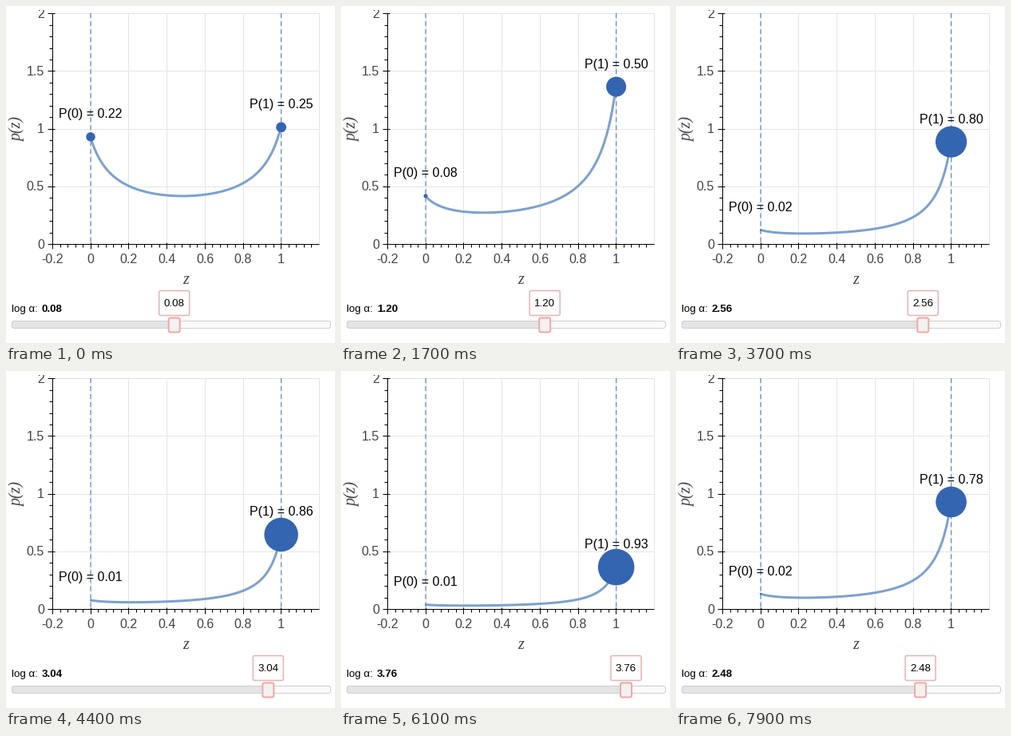
A matplotlib script that plays this animation: 412x422 px, repeating every 8000 ms.

```python
import numpy as np
import matplotlib.pyplot as plt
from matplotlib.animation import FuncAnimation
from matplotlib.patches import Circle, FancyBboxPatch, Rectangle

W, H, DPI = 412, 422, 100
FRAMES, INTERVAL = 80, 100
PX = 72 / DPI  # points per pixel

# Hard concrete distribution: temperature and stretch limits
BETA, LOW, HIGH = 0.5, -0.1, 1.1

# Slider position over time, in steps of 0.08
STEP = 0.08
KEY_FRAMES = [0, 9, 26, 37, 50, 57, 58, 61, 79]
KEY_STEPS = [1, 8, 22, 32, 44, 50, 50, 47, 31]

LEFT, RIGHT, TOP, BOTTOM = 58, 392, 9, 298
BLUE, CURVE, DASH = "#3465b0", "#7ca1ce", "#5a88bb"
GRID, GREY = "#e5e5e5", "#444444"
SALMON, PINK = "#f0a9a1", "#e6b6b8"


def sigmoid(x):
    return 1 / (1 + np.exp(-x))


def density(z, log_alpha):
    s = (z - LOW) / (HIGH - LOW)
    q = sigmoid(BETA * np.log(s / (1 - s)) - log_alpha)
    return q * (1 - q) * BETA / (s * (1 - s)) / (HIGH - LOW)


def px(z):
    return 105.7 + 238.6 * z


def py(p):
    return BOTTOM - 144.4 * p


fig = plt.figure(figsize=(W / DPI, H / DPI), dpi=DPI, facecolor="white")
ax = fig.add_axes([0, 0, 1, 1])
ax.set_xlim(0, W)
ax.set_ylim(H, 0)
ax.axis("off")


def line(xs, ys, color, width=1, z=1, **kw):
    kw.setdefault("solid_capstyle", "butt")
    return ax.plot(xs, ys, color=color, lw=width * PX, zorder=z, **kw)[0]


def label(x, y, text, size=16, color="black", ha="center", z=6, **kw):
    kw.setdefault("family", "Liberation Sans")
    kw.setdefault("va", "baseline")
    return ax.text(x, y, text, fontsize=size * PX, color=color, ha=ha, zorder=z, **kw)


def box(x, y, w, h, face, edge, width=1, radius=2, z=3):
    style = f"round,pad=0,rounding_size={radius}"
    patch = FancyBboxPatch((x, y), w, h, boxstyle=style, facecolor=face,
                           edgecolor=edge, lw=width * PX, zorder=z)
    return ax.add_patch(patch)


def draw_axes():
    for i in range(8):
        x = px(-0.2 + 0.2 * i)
        line([x, x], [TOP, BOTTOM], GRID)
        if i < 7:
            line([x, x], [BOTTOM - 2, BOTTOM + 6], "black", z=2)
            label(x + 0.3, 321.5, f"{round(-0.2 + 0.2 * i, 1) + 0:g}", color=GREY)
    for i in range(5):
        y = py(0.5 * i)
        line([LEFT, RIGHT], [y, y], GRID)
        line([LEFT - 6, LEFT + 3], [y, y], "black", z=2)
        label(48, y + 5.5, f"{0.5 * i:g}", color=GREY, ha="right")
    for i in range(35):
        x = px(-0.2 + 0.04 * i)
        line([x, x], [BOTTOM, BOTTOM + 4], "black", z=2)
    for i in range(21):
        y = py(0.1 * i)
        line([LEFT - 4, LEFT], [y, y], "black", z=2)
    line([LEFT, LEFT], [TOP, BOTTOM], "black", z=2)
    line([LEFT, RIGHT], [BOTTOM, BOTTOM], "black", z=2)
    for z in (0, 1):
        line([px(z) + 0.3] * 2, [TOP, BOTTOM], DASH, 1.2, z=3,
             linestyle=(0, (5, 3.35)), dash_capstyle="butt", snap=False)
    # The top tick label is cropped by the edge of the plot
    ax.add_patch(Rectangle((0, 0), W, 5, facecolor="white", lw=0, zorder=7))
    serif = dict(family="Liberation Serif", style="italic", color=GREY)
    label(225.5, 348, "z", 20, **serif)
    label(14, 154, "p(z)", 20, rotation=90, va="center", **serif)


draw_axes()

zs = np.linspace(0, 1, 201)
curve = line(px(zs), py(zs), CURVE, 3, z=4)
dots = [ax.add_patch(Circle((px(z), 0), 1, facecolor=BLUE, lw=0, zorder=5))
        for z in (0, 1)]
tags = [label(px(z), 0, "") for z in (0, 1)]

label(7, 383, "log α:", 13.33, ha="left")
value = label(45, 383, "", 13.33, ha="left", weight="bold")
box(7.5, 394.5, 399, 9, "#fafafa", "#cfcfcf", radius=3, z=2)
fill = box(7.5, 394.5, 1, 9, "#e4e4e4", "#cfcfcf", radius=3)
handle = box(0, 390.5, 14, 18, "#f3f1f1", SALMON, 2, z=5)
tip = box(0, 356.5, 38, 31, "white", PINK, 1.6, z=5)
tip_text = label(0, 376, "", 13.33)


def update(frame):
    step = round(float(np.interp(frame, KEY_FRAMES, KEY_STEPS)))
    log_alpha = STEP * step

    curve.set_ydata(py(density(zs, log_alpha)))
    edge = BETA * np.log(-LOW / HIGH)
    masses = sigmoid(edge - log_alpha), sigmoid(edge + log_alpha)
    for z, (dot, tag, mass) in enumerate(zip(dots, tags, masses)):
        y = py(density(z, log_alpha))
        dot.center = px(z) + 0.3, y
        dot.set_radius(24 * mass + 0.5)
        tag.set_position((px(z) + 0.3, y - 23.5))
        tag.set_text(f"P({z}) = {mass:.2f}")

    x = 207.5 + 39.75 * log_alpha
    text = f"{log_alpha:.2f}"
    value.set_text(text)
    tip_text.set_text(text)
    tip_text.set_x(x)
    fill.set_width(x - 7.5)
    handle.set_x(x - 7)
    tip.set_x(x - 19)
    return [curve, *dots, *tags, value, tip_text, fill, handle, tip]


anim = FuncAnimation(fig, update, frames=FRAMES, interval=INTERVAL,
                     repeat=True, repeat_delay=0, blit=False)
plt.show()
```
